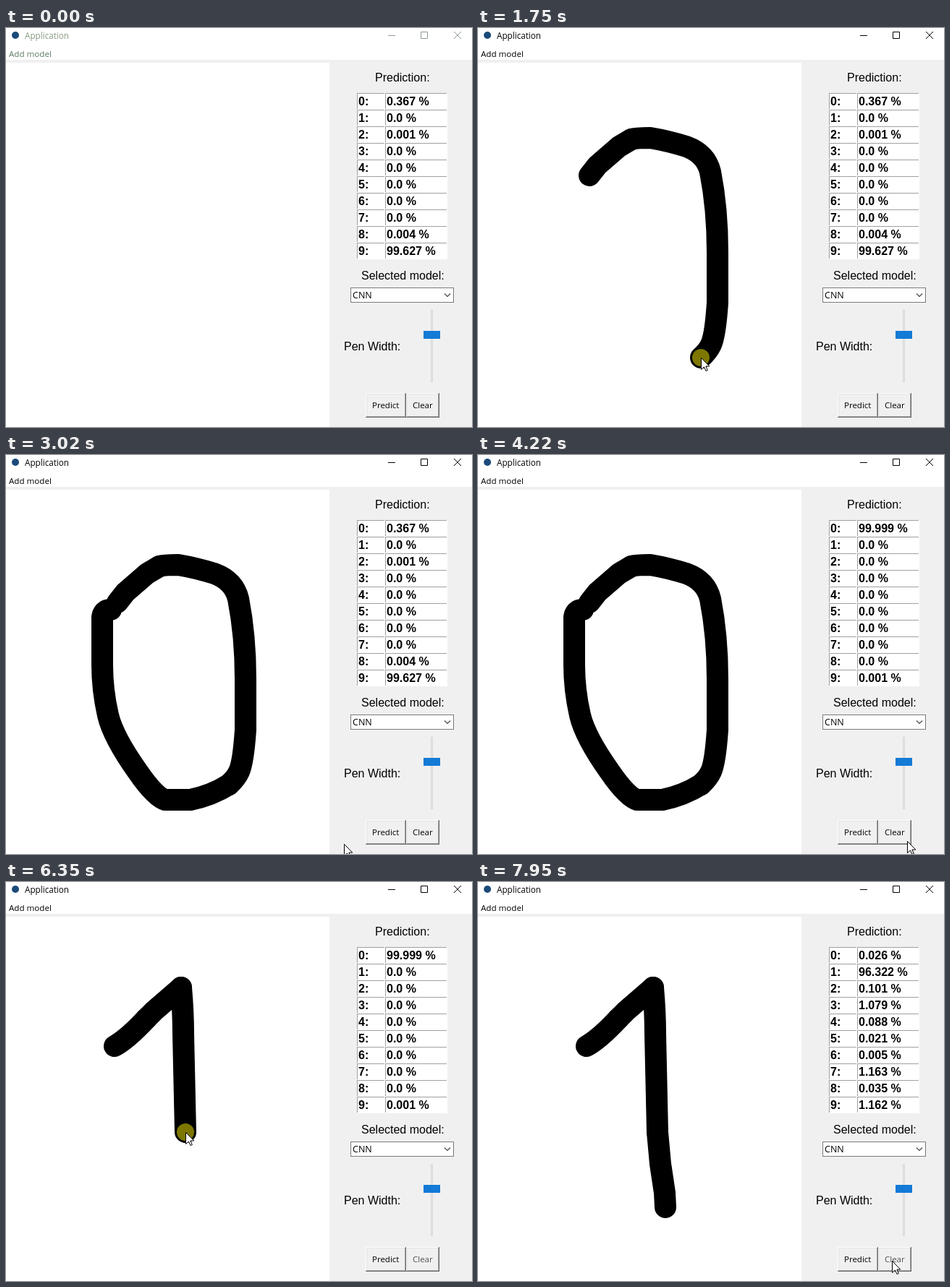
Animation of 644x552 px, one loop 8 s. Source, as an HTML page with a canvas:

```html
<!DOCTYPE html>
<html lang="en">
<head>
<meta charset="utf-8">
<title>Application</title>
<style>
html, body { margin: 0; width: 100%; height: 100%; overflow: hidden; background: #fff; }
canvas { display: block; }
</style>
</head>
<body>
<canvas id="stage" width="644" height="552"></canvas>
<script>
const ctx = document.getElementById('stage').getContext('2d');
const LOOP = 8000, FOCUS = 640, CLEARED = 4660;
const UI = '"Open Sans", "Noto Sans", sans-serif';
const ARIAL = '"Liberation Sans", Arial, sans-serif';

// One leg of the pointer's way; with `until` it leaves ink up to that time
function leg(from, to, d, until = 0) {
  const path = document.createElementNS('http://www.w3.org/2000/svg', 'path');
  path.setAttribute('d', d);
  return { from, to, until, path, shape: new Path2D(d), length: path.getTotalLength() };
}

const legs = [
  leg(120, 560, 'M40 390L50 260L154 204'),
  leg(640, 890, 'M154 204L165 190L195 164L212 154', CLEARED),
  leg(900, 1750, 'M212 154Q218 152 238 152Q262 156 288 164Q315 174 321 199Q331 250 331 310V380Q328 425 322 438Q318 447 308 456', CLEARED),
  leg(1790, 2550, 'M308 456Q284 471 255 477H220Q206 473 182 438Q148 390 141 360Q133 325 133 290V226', CLEARED),
  leg(2570, 2650, 'M133 226Q133 214 145 214', CLEARED),
  leg(2670, 3020, 'M145 214L467 538'),
  leg(3070, 3370, 'M467 538L520 518'),
  leg(3950, 4220, 'M520 518L593 534'),
  leg(4400, 4540, 'M593 534L575 524'),
  leg(4690, 5120, 'M575 524L150 227'),
  leg(5280, 5560, 'M150 227Q168 217 194 189', LOOP),
  leg(5610, 5830, 'M194 189L205 178L242 146', LOOP),
  leg(5990, 6350, 'M242 146Q245 180 245 210L248 346', LOOP),
  leg(6400, 6780, 'M248 346L252 390L258 430L259 450', LOOP),
  leg(6810, 6990, 'M259 450L482 513'),
  leg(7120, 7290, 'M482 513L519 519'),
  leg(7530, 7870, 'M519 519L571 523'),
  leg(7930, 7950, 'M571 523L572 524')
];
const presses = [[640, 2660], [3420, 3560], [4560, CLEARED], [5280, 6800], [7330, 7480]];
const results = [
  { at: 0, 0: '0.367', 2: '0.001', 8: '0.004', 9: '99.627' },
  { at: 3560, 0: '99.999', 9: '0.001' },
  { at: 7480, 0: '0.026', 1: '96.322', 2: '0.101', 3: '1.079', 4: '0.088',
    5: '0.021', 6: '0.005', 7: '1.163', 8: '0.035', 9: '1.162' }
];

const progress = (l, t) => Math.max(0, Math.min(1, (t - l.from) / (l.to - l.from)));

function pointerAt(t) {
  const current = legs.filter(l => l.from <= t).pop() || legs[0];
  return current.path.getPointAtLength(current.length * progress(current, t));
}

function rect(x, y, w, h, color) {
  ctx.fillStyle = color;
  ctx.fillRect(x, y, w, h);
}

function text(str, x, y, font, color = '#000') {
  ctx.font = font;
  ctx.fillStyle = color;
  ctx.fillText(str, x, y);
}

function disc(x, y, r, color) {
  ctx.fillStyle = color;
  ctx.beginPath();
  ctx.arc(x, y, r, 0, 7);
  ctx.fill();
}

function line(d, color, width = 1) {
  ctx.strokeStyle = color;
  ctx.lineWidth = width;
  ctx.stroke(new Path2D(d));
}

function drawTitleBar(active) {
  const color = active ? '#000' : '#8f9a8f';
  rect(0, 0, 644, 44, '#fff');
  disc(13, 10, 5, '#1b4a7a');
  text('Application', 26, 15, `11.7px ${UI}`, active ? '#000' : '#869a80');
  text('Add model', 4, 40, `11.6px ${UI}`, active ? '#000' : '#5c7a62');
  rect(528, 10, 10, 1, color);
  line('M573.5 5.5h9v9h-9z', color);
  line('M619 5l10 10m0 -10l-10 10', color);
}

function drawCell(x, y, w, str) {
  rect(x, y, w, 23, '#fff');
  rect(x, y, w - 1, 1, '#a0a0a0');
  rect(x, y, 1, 22, '#a0a0a0');
  text(str, x + 2, y + 17, `bold 16px ${ARIAL}`);
}

function drawButton(x, w, label, labelX, color, sunk) {
  const y = 505, h = 34, shift = sunk ? 1 : 0;
  rect(x, y, w, h, sunk ? '#fff' : '#696969');
  rect(x, y, w - 1, h - 1, sunk ? '#696969' : '#fff');
  rect(x + 1, y + 1, w - 2, h - 2, sunk ? '#e3e3e3' : '#a0a0a0');
  rect(x + 1, y + 1, w - 3, h - 3, sunk ? '#a0a0a0' : '#e3e3e3');
  rect(x + 2, y + 2, w - 4, h - 4, '#f0f0f0');
  text(label, labelX + shift, 526 + shift, `11.5px ${UI}`, color);
}

function drawPanel(t, pressed, pointer) {
  rect(0, 44, 644, 4, '#f0f0f0');
  rect(447, 44, 197, 508, '#f0f0f0');
  text('Prediction:', 510, 74, `16px ${ARIAL}`);
  const values = results.filter(r => r.at <= t).pop();
  for (let i = 0; i < 10; i++) {
    drawCell(485, 90 + i * 23, 39, `${i}:`);
    drawCell(524, 90 + i * 23, 86, `${values[i] || '0.0'} %`);
  }

  text('Selected model:', 491, 348, `16px ${ARIAL}`);
  rect(476, 359, 143, 21, '#7a7a7a');
  rect(477, 360, 141, 19, '#fff');
  text('CNN', 479, 374, `12.5px ${UI}`);
  line('M606 367.5l4 4l4 -4', '#444', 1.1);

  text('Pen Width:', 467, 446, `16px ${ARIAL}`);
  rect(587, 390, 3, 100, '#d6d6d6');
  rect(588, 391, 1, 98, '#e7eaea');
  rect(577, 419, 23, 11, '#137ad6');

  const onButtons = pressed && pointer.y > 505;
  drawButton(497, 56, 'Predict', 506, '#000', onButtons && pointer.x < 553);
  drawButton(553, 46, 'Clear', 562, t < CLEARED ? '#000' : '#55504f', onButtons && pointer.x >= 553);
}

function drawInk(t) {
  ctx.save();
  ctx.lineCap = ctx.lineJoin = 'round';
  ctx.strokeStyle = '#000';
  ctx.lineWidth = 30;
  for (const l of legs) {
    if (t < l.from || t >= l.until) continue;
    ctx.setLineDash([Math.max(.01, l.length * progress(l, t)), 9999]);
    ctx.stroke(l.shape);
  }
  ctx.restore();
}

function drawPointer({ x, y }, pressed) {
  if (pressed) disc(x, y, 12, 'rgba(250, 238, 0, .5)');
  const arrow = `M${Math.round(x) + .5} ${Math.round(y) + .5}v16l4 -3.5l2.5 5.5l2.3 -1l-2.4 -5.5h4.9z`;
  ctx.fillStyle = '#fff';
  ctx.fill(new Path2D(arrow));
  line(arrow, '#000');
}

function draw() {
  const t = performance.now() % LOOP;
  const pointer = pointerAt(t);
  const pressed = presses.some(([a, b]) => t >= a && t < b);
  rect(0, 0, 644, 552, '#fff');
  drawInk(t);
  drawTitleBar(t >= FOCUS);
  drawPanel(t, pressed, pointer);
  if (t >= 120) drawPointer(pointer, pressed);
  requestAnimationFrame(draw);
}
draw();
</script>
</body>
</html>
```
